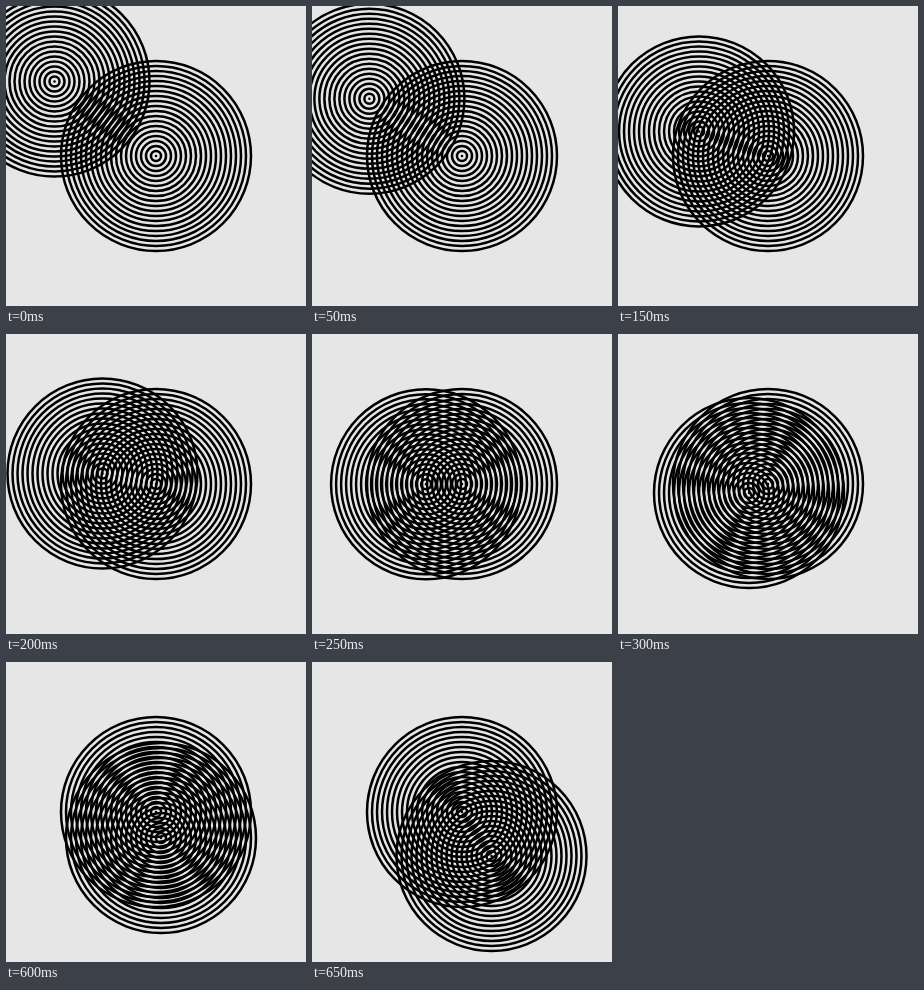
An HTML page that plays this animation: 300x300 px, repeating every 700 ms.

```html
<!DOCTYPE html>
<html lang="en">
<head>
<meta charset="utf-8">
<title>Moiré rings</title>
<style>
  html, body { margin: 0; width: 100%; height: 100%; overflow: hidden; background: #e6e6e6; }
  svg { display: block; width: 100vw; height: 100vh; }
</style>
</head>
<body>
<svg viewBox="0 0 300 300">
  <defs><g id="rings" fill="none" stroke="#000" stroke-width="2.5"></g></defs>
  <use href="#rings" x="150" y="150"/>
  <use href="#rings" id="mover"/>
</svg>
<script>
  const LOOP = 700, TICK = 50, KEY = 100, PITCH = 5, COUNT = 19;
  const ARRIVE = 400, SETTLE = 600, LEAVE = 650;
  const rings = document.getElementById('rings');
  const mover = document.getElementById('mover');

  function addCircle(r, attrs = {}) {
    const c = document.createElementNS('http://www.w3.org/2000/svg', 'circle');
    c.setAttribute('r', r);
    for (const k in attrs) c.setAttribute(k, attrs[k]);
    rings.append(c);
  }

  addCircle(1.25, { fill: '#000', stroke: 'none' });
  for (let i = 1; i <= COUNT; i++) addCircle(i * PITCH);

  // Points on the way in, one every KEY ms, then the two poses on the way out
  const path = [[48.5, 75.5], [67.5, 109.5], [96.5, 139.5], [131, 159], [155, 172]];
  const settled = [155, 176], leaving = [179.5, 194];

  // Catmull-Rom curve through the path, u counted in points
  function along(u) {
    const i = Math.min(Math.floor(u), path.length - 2), f = u - i;
    return [0, 1].map(k => {
      const b = path[i][k], c = path[i + 1][k];
      const a = i > 0 ? path[i - 1][k] : 2 * b - c;
      const d = (path[i + 2] || settled)[k];
      return b + f / 2 * (c - a + f * (2 * a - 5 * b + 4 * c - d + f * (3 * (b - c) + d - a)));
    });
  }

  function centre(t) {
    if (t >= LEAVE) return leaving;
    if (t >= SETTLE) return settled;
    const tick = Math.floor(t / TICK) * TICK;
    return along(Math.min(tick, ARRIVE) / KEY);
  }

  const start = performance.now();
  function draw() {
    const [x, y] = centre((performance.now() - start) % LOOP);
    mover.setAttribute('transform', `translate(${x} ${y})`);
    requestAnimationFrame(draw);
  }
  draw();
</script>
</body>
</html>
```
